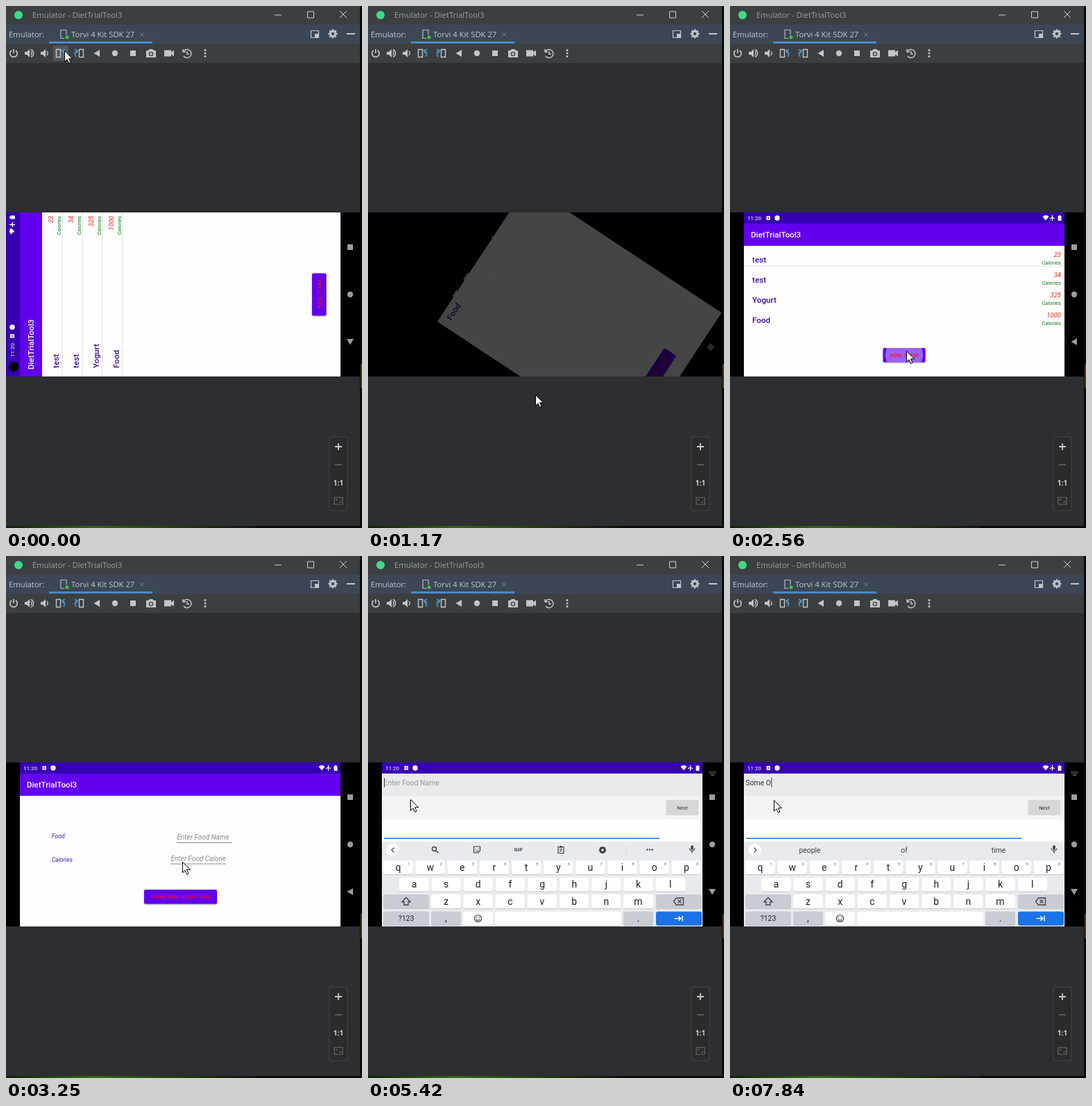
Animation, 513 px wide and 751 px high, one loop 8 s. Source, as an HTML page with a canvas:

```html
<!DOCTYPE html>
<html lang="en">
<head>
<meta charset="utf-8">
<title>Emulator</title>
<style>
html, body { margin: 0; width: 100%; height: 100%; overflow: hidden; background: #2d2e31; }
canvas { display: block; }
</style>
</head>
<body>
<canvas width="513" height="751"></canvas>
<script>
const c = document.querySelector('canvas').getContext('2d');
const LOOP = 8000, APP = 'DietTrialTool3', DEVICE = 'Torvi 4 Kit SDK 27';
const PURPLE = '#6200ee', INDIGO = '#3700b3', PAPER = '#fefefe', ICON = '#c3c5c7';
const BLUE = '#3f9bd1', BAR = '#3c3f41', KEY = '#c9ccd3', INK = '#3c4043';
const UI = '"Open Sans", "Noto Sans", sans-serif', DROID = 'Roboto, sans-serif';

const span = (t, a, b) => Math.min(1, Math.max(0, (t - a) / (b - a)));
const ease = p => p * p * (3 - 2 * p);

function box(x, y, w, h, color, r = 0) {
  c.fillStyle = color;
  c.beginPath();
  c.roundRect(x, y, w, h, r);
  c.fill();
}
function dot(x, y, r, color) {
  c.fillStyle = color;
  c.beginPath();
  c.arc(x, y, r, 0, 7);
  c.fill();
}
function text(s, x, y, font, color, align = 'left', gap = 0) {
  c.font = font;
  c.fillStyle = color;
  c.textAlign = align;
  c.letterSpacing = gap + 'px';
  c.fillText(s, x, y);
}
// Strokes the path, or fills it when the line width is 0
function icon(d, x, y, color = ICON, width = 1.4) {
  const p = new Path2D(d);
  c.save();
  c.translate(x, y);
  c.fillStyle = c.strokeStyle = color;
  c.lineWidth = width;
  width ? c.stroke(p) : c.fill(p);
  c.restore();
}
function layer(draw) {
  c.save();
  draw();
  c.restore();
}
function gear(x, y, r, color, hole) {
  for (let i = 0; i < 4; i++) layer(() => {
    c.translate(x, y);
    c.rotate(i * Math.PI / 4);
    box(-1.3, -r, 2.6, 2 * r, color);
  });
  dot(x, y, r * .76, color);
  dot(x, y, r * .35, hole);
}

function windowFrame(t) {
  box(0, 0, 513, 751, '#090b0a');
  const grass = c.createLinearGradient(0, 0, 360, 0);
  grass.addColorStop(0, '#10200a');
  grass.addColorStop(.35, '#376512');
  grass.addColorStop(1, '#10140c');
  box(0, 748, 360, 3, grass);
  box(511, 515, 2, 35, '#5a3514');
  box(0, 0, 510, 748, '#2d2e31');
  box(0, 0, 510, 27, BAR);
  box(0, 27, 510, 28, '#3c4756');
  box(0, 54, 510, 28, BAR);

  dot(18, 13, 6, '#3ddc84');
  text('Emulator - ' + APP, 38, 17, '11.25px ' + UI, '#9b9ea0');
  icon('M-5 0H5', 392, 13, '#d0d0d0', 1);
  icon('M-4.5-4.5h9v9h-9z', 439, 12.5, '#d0d0d0', 1);
  icon('M-5-5L5 5M5-5L-5 5', 486, 12, '#d0d0d0', 1);

  text('Emulator:', 4, 45, '11.25px ' + UI, '#c3c7cb');
  icon('M4 1V-6H-4V6H1', 83, 40.5, '#b4b9be', 1.2);
  dot(88, 45, 2.5, '#45c04a');
  text(DEVICE, 94, 45, '11.25px ' + UI, '#c3c7cb');
  icon('M-3-3L3 3M3-3L-3 3', 196, 41, '#737b84', 1);
  box(62, 51, 149, 3, '#4a88c7');
  icon('M-5.5-5h11v10h-11z', 445, 40.5, ICON, 1.2);
  box(445, 40, 5, 5, ICON);
  gear(471, 40, 6.5, ICON, '#3c4756');
  box(491, 39, 12, 2, ICON);
  toolbar(t);

  box(465.5, 619.5, 27, 107, '#414446', 4);
  box(466.5, 620.5, 25, 105, '#2b2b2b', 3);
  icon('M-5 0H5M0-5V5', 479, 634, '#c8c8c8', 1.8);
  icon('M-5 0H5', 479, 660, '#66686a', 1.5);
  text('1:1', 479, 690, 'bold 10px ' + UI, '#d0d0d0', 'center');
  icon('M-6-5H6V5H-6zM-3 0V-2H-1M3 0V2H1', 479, 712, '#66686a', 1.2);
}
function toolbar(t) {
  const y = 68;
  if (t < 120) box(68, 57, 22, 22, '#54585b', 3);
  icon('M-3-4A5.2 5.2 0 1 0 3-4M0-6V0', 11, y, ICON, 1.7);
  icon('M-6-2h3l4-4v12l-4-4h-3z', 33, y, ICON, 0);
  icon('M2.5-3a3.5 3.5 0 0 1 0 6M3-5.5a6 6 0 0 1 0 11', 33, y);
  icon('M-5-2h3l4-4v12l-4-4h-3z', 55, y, ICON, 0);
  icon('M3.5-3a3.5 3.5 0 0 1 0 6', 55, y);
  icon('M-6.5-5.5h6v11h-6z', 79, y);
  icon('M2-4q6 3 2 9M6-5.5L2-4 3.5 0', 79, y, BLUE, 1.7);
  icon('M.5-5.5h6v11h-6z', 105, y);
  icon('M-2-4q-6 3-2 9M-6-5.5L-2-4-3.5 0', 105, y, BLUE, 1.7);
  icon('M4-5V5L-4.5 0z', 131, y, ICON, 0);
  dot(157, y, 4.2, ICON);
  box(179, 64, 8, 8, ICON);
  icon('M-7-4h3l2-2h4l2 2h3v10h-14z', 209, y, ICON, 0);
  dot(209, 69, 3.3, BAR);
  dot(209, 69, 1.9, ICON);
  icon('M-7-4.5h10v3l4-3v9l-4-3v3h-10z', 235, y, ICON, 0);
  icon('M-5-3A6 6 0 1 1-5 4M-6-6v4h4M0-3V1H3', 261, y, ICON, 1.5);
  for (const dy of [-4.5, 0, 4.5]) dot(287, y + dy, 1.5, ICON);
}

function clock(x, y) {
  text('11:20', x, y + 3, '8px ' + DROID, '#fff');
  box(x + 27.5, y - 3, 5.5, 6, '#fff', 1);
  dot(x + 30.3, y, 1, INDIGO);
  dot(x + 43, y, 3.7, '#fff');
}
function status(x, right, y) {
  clock(x, y);
  icon('M-4.5-2Q0-6 4.5-2L0 3.5z', right - 27, y, '#fff', 0);
  icon('M0-4V4M-3.5 1L0-1 3.5 1', right - 17.5, y, '#fff', 1.3);
  box(right - 9.5, y - 3, 5, 7, '#fff', .8);
  box(right - 8, y - 4, 2, 1, '#fff');
}
function nav(down) {
  const grey = '#9c9c9c';
  box(492, 343, 8, 8, grey);
  dot(496, 415, 4.2, grey);
  icon(down ? 'M-5-4H5L0 4.5z' : 'M4-5V5L-4.5 0z', 496, 483, grey, 0);
}
function button(x, y, w, label, ripple = 0) {
  layer(() => {
    c.shadowColor = 'rgba(0,0,0,.35)';
    c.shadowBlur = 2;
    c.shadowOffsetY = 1;
    box(x, y, w, 20.5, PURPLE, 2);
  });
  if (ripple) layer(() => {
    c.beginPath();
    c.rect(x, y, w, 20.5);
    c.clip();
    dot(x + w / 2, y + 10, ripple, 'rgba(255,255,255,.38)');
  });
  text(label, x + w / 2 + .3, y + 13.2, '500 8px ' + DROID, '#f5142a', 'center', .7);
}
// App screens are drawn from the top left corner of the app bar
function appBar(w, h, body) {
  box(0, 0, w, h, body);
  box(0, 0, w, 32, PURPLE);
  text(APP, 10, 20.3, '500 11.6px ' + DROID, '#fff');
}
function list(w, h, lines, ripple) {
  appBar(w, h, PAPER);
  [['test', 23], ['test', 34], ['Yogurt', 325], ['Food', 1000]].forEach(([name, amount], i) => {
    const y = 29 * i;
    text(name, 12, y + 56, '500 11.7px ' + DROID, '#3c0c9c');
    text(amount, w - 5, y + 47.7, 'italic 9.5px ' + DROID, '#e8261c', 'right');
    text('Calories', w - 5, y + 58.5, '7.6px ' + DROID, '#0c7a12', 'right');
    if (i < lines) box(0, y + 60.5, w, 1, '#dedede');
  });
  button(w / 2 - 30.5, h - 41, 61, 'ADD ITEM', ripple);
}
function form(w, h, focused) {
  appBar(w, h, PAPER);
  const label = 'italic 8.5px ' + DROID, hint = 'italic 10px ' + DROID;
  text('Food:', 46, 93, label, '#4c1ba0');
  text('Calories', 46, 127, label, '#4c1ba0');
  text('Enter Food Name', 226.5, 95, hint, '#8c8c8c');
  box(226, 99, 80, 1, focused ? '#03dac5' : '#8c8c8c');
  if (focused) box(226, 84, 1, 14, '#03dac5');
  layer(() => {
    c.beginPath();
    c.rect(217, 114, 80, 20);
    c.clip();
    text('Enter Food Calories', 217.5, 125.5, hint, '#8c8c8c');
  });
  box(217, 129.5, 80, 1, '#8c8c8c');
  button(179, 167, 105, 'CONFIRM ADDITION');
}

function portrait() {
  layer(() => {
    c.translate(0, 533);
    c.rotate(-Math.PI / 2);
    box(0, 0, 236, 20, INDIGO);
    dot(14, 11, 7, '#000');
    status(28, 236, 9);
    c.translate(0, 20);
    list(236, 462, 4);
  });
  nav(true);
}
function zoomed(scale, alpha, draw) {
  layer(() => {
    c.globalAlpha = alpha;
    c.translate(251, 415);
    c.scale(scale, scale);
    c.translate(-231, -102);
    draw();
  });
}
function landscape(t) {
  const open = ease(span(t, 2760, 3060));
  const keys = t >= 4450;
  nav(keys);
  if (open < 1) zoomed(1 + .045 * open, 1, () =>
    list(462, 220, 1, t >= 2540 && 27 + (t - 2560) * .08));
  if (open > 0) zoomed(.9 + .1 * open, open, () => form(462, 220, t >= 4040));
  if (t >= 4040) {
    for (let i = 0; i < 10; i++) box(492 + i % 5 * 2, 310 + (i > 4) * 2, 1, 1, '#aaa');
    box(494, 314.5, 5, 1, '#aaa');
  }
  if (t > 4180) extract(t, keys);
  box(20, 297, 462, 16, INDIGO);
  status(25, 482, 305);
}

function extract(t, keys) {
  const shown = span(t, 4180, 4590);
  const count = t < 6920 ? 0 : t < 7840 ? Math.min(5, Math.floor((t - 6920) / 152) + 1) : 6;
  const typed = 'Some O'.slice(0, count);
  layer(() => {
    c.globalAlpha = shown;
    c.translate(0, 40 * (1 - shown));
    if (keys) {
      box(20, 313, 462, 32, '#e9eaec');
      box(20, 345, 462, 34, '#f3f3f3');
      box(20, 379, 462, 32, PAPER);
      box(23, 405.5, 397, 1.5, '#1a73e8');
      keyboard(t, count);
    } else box(20, 313, 462, 161, '#eeeff0');
    const y = keys ? 351 : 411;
    box(429.5, y, 47, 22, '#d6d8d8', 2);
    text('Next', 453, y + 13.7, '7.6px ' + DROID, '#333', 'center');
    text(typed || 'Enter Food Name', 22.5, 330, '10.4px ' + DROID, typed ? '#333' : '#96989a');
    if (count || Math.floor((t - 5150) / 490) % 2 === 0)
      box(count ? 23 + c.measureText(typed).width : 23, 319, 1, 14, INK);
  });
}
function key(x, y, w, label, color = '#fff', size = 14) {
  box(x, y + 1, w, 20, '#c4c6ca', 3);
  box(x, y, w, 20, color, 3);
  text(label, x + w / 2, y + 10 + size * .33, size + 'px ' + DROID, '#202124', 'center');
}
function keyboard(t, count) {
  box(20, 411, 462, 122, '#e8eaed');
  dot(36, 423, 9, '#fff');
  icon(count ? 'M-1.5-3.5L2 0-1.5 3.5' : 'M1.5-3.5L-2 0 1.5 3.5', 36, 423, INK, 1.2);
  if (count) {
    const words = t < 7840 ? ['Someone', 'Some', 'Something'] : ['people', 'of', 'time'];
    words.forEach((s, i) => text(s, 115 + 136 * i, 426.5, '10.4px ' + DROID, INK, 'center'));
  } else tools();
  icon('M-1.8-4a1.8 1.8 0 0 1 3.6 0v3a1.8 1.8 0 0 1-3.6 0z', 467, 422, INK, 0);
  icon('M-3.7-1.5a3.7 3.7 0 0 0 7.4 0M0 2.5V5.5', 467, 422, INK, 1.2);

  const pitch = 46.15;
  [['qwertyuiop', 22, 438], ['asdfghjkl', 45, 462.5], ['zxcvbnm', 91, 487]].forEach(([row, x, y], r) =>
    [...row].forEach((ch, i) => {
      key(x + pitch * i, y, 43, ch);
      if (!r) text((i + 1) % 10, x + pitch * i + 37, y + 7, '6px ' + DROID, '#5f6368', 'center');
    }));
  key(22, 487, 66, '', KEY);
  icon('M0-5.5L6 0.5H3V5H-3V.5H-6z', 55, 497, INK, 1.3);
  key(415, 487, 66, '', KEY);
  icon('M-7 0L-3-5H7V5H-3zM-1-2.5L4 2.5M4-2.5L-1 2.5', 447.5, 497, INK, 1.3);
  const y = 511.5;
  key(22, y, 66, '?123', KEY, 10.5);
  key(91, y, 43, ',', KEY);
  key(137, y, 43, '');
  icon('M-5 0a5 5 0 1 0 10 0a5 5 0 1 0-10 0M-2.7 1.2q2.7 3.4 5.4 0M-2-2.2v1.4M2-2.2v1.4', 158.5, 521.5, INK, 1.2);
  key(183, y, 182, '');
  key(368, y, 43, '.', KEY);
  key(415, y, 66, '', '#1a73e8');
  icon('M-6 0H3M0-3.2L3.2 0 0 3.2M5.5-4V4', 447.5, 521.5, '#fff', 1.4);
}
function tools() {
  const y = 422.5;
  icon('M-4.5-1a3 3 0 1 0 6 0a3 3 0 1 0-6 0M1 1.5L4.5 5', 97, y, INK, 1.4);
  icon('M-4.5-4.5h9v6l-3 3h-6zM-2-1.5v1M2-1.5v1M-2 1.5q2 1.5 4 0', 157, y, INK, 1.2);
  text('GIF', 217, 425.3, '700 7.5px ' + DROID, INK, 'center', .4);
  icon('M-4-4h8v9h-8zM-2-2.5h4M-2 0h4M-2 2h3M-1.5-5h3', 278, y, INK, 1.2);
  gear(338, 423, 5.2, INK, '#e8eaed');
  box(372, 416, 1, 14, '#dadce0');
  for (const dx of [-3.7, 0, 3.7]) dot(406 + dx, y, 1.2, INK);
}

function phone(t) {
  layer(() => {
    c.beginPath();
    c.rect(0, 297, 510, 236);
    c.clip();
    box(0, 297, 510, 236, '#000');
    const turn = ease(span(t, 1050, 1343)), old = t < 1217;
    layer(() => {
      c.translate(255, 415);
      c.rotate((old ? turn : turn - 1) * Math.PI / 2);
      c.translate(-255, -415);
      if (!old) return landscape(t);
      portrait();
      if (t > 620) {
        box(-1, 296, 148, 238, '#000');
        box(145, 450, 2, 12, '#fff');
        box(145, 480, 2, 10, '#fff');
        box(146, 386, 1, 3, '#fff');
      }
    });
    if (t > 620 && t < 1050) clock(25, 308);
    const dark = old ? span(t, 1050, 1217) : 1 - span(t, 1217, 1420);
    if (dark) box(0, 297, 510, 236, `rgba(0,0,0,${dark})`);
  });
}

const route = [
  [0, 84, 64], [110, 84, 64], [650, 266, 591], [920, 266, 591], [1050, 258, 585],
  [1170, 241, 559], [1700, 250, 500], [2160, 254, 496], [2900, 254, 496], [3500, 254, 406],
  [3640, 261, 410], [4040, 261, 410], [4310, 259, 413], [4400, 259, 413], [5000, 50, 341],
  [5420, 61, 350], [5720, 63, 351], [LOOP, 63, 351]
];
function pointer(t) {
  const i = route.findIndex(p => p[0] > t);
  const [a, x, y] = route[i - 1], [b, x2, y2] = route[i];
  const p = ease(span(t, a, b));
  const px = x + (x2 - x) * p, py = y + (y2 - y) * p;
  const arrow = 'M.5.5V16L4 12.7 6.5 18.3 9 17.2 6.5 11.7H11.5z';
  icon(arrow, px, py, '#fff', 0);
  icon(arrow, px, py, '#000', 1);
}

function frame(now) {
  const t = now % LOOP;
  windowFrame(t);
  phone(t);
  pointer(t);
  requestAnimationFrame(frame);
}
requestAnimationFrame(frame);
</script>
</body>
</html>
```
